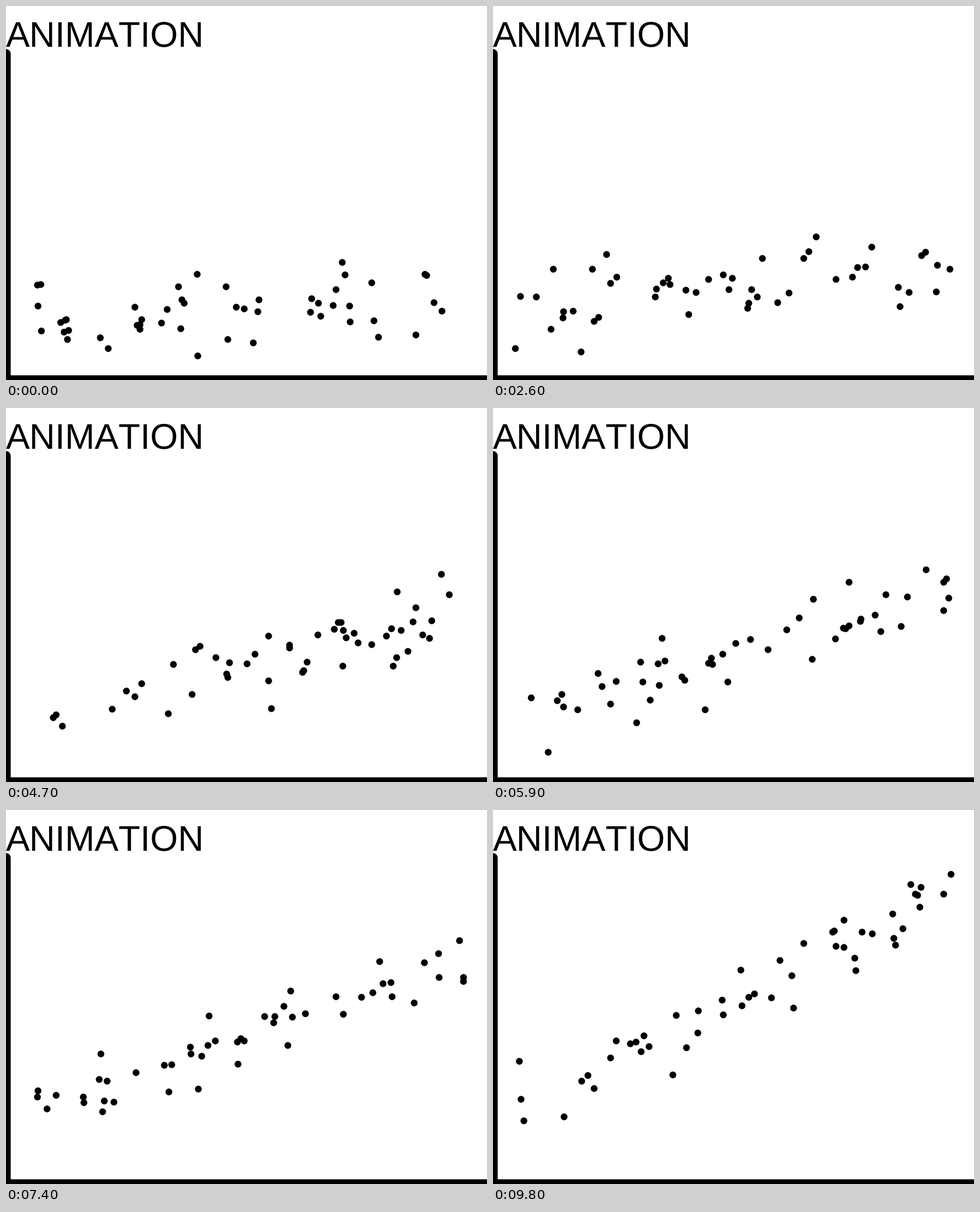
Animation of 849 by 660 pixels, one loop 10000 ms. Source, as a matplotlib script:

```python
import numpy as np
import matplotlib.pyplot as plt
from matplotlib.animation import FuncAnimation

W, H, DPI = 849, 660, 96
PX = 72 / DPI          # points per pixel
STEP = 100             # ms per tick
COUNT = 50
LEFT, RIGHT = 38, 811  # horizontal reach of the dots
TOP, BOTTOM = 110, 634
BAR = 16.6

# Plain letter advances: no hinting, kerning scaled down to nothing
plt.rcParams["text.hinting"] = "none"
plt.rcParams["text.kerning_factor"] = 6


def sample_index(ms):
    """Number of the sample on show: 200 ms, then 300 ms each, then 200 ms."""
    if ms < 200:
        return 0
    if ms < 6200:
        return 1 + (ms - 200) // 300
    return 21 + (ms - 6200) // 200


def sample(k):
    """Fresh random dots around a trend line that steepens with k."""
    rng = np.random.default_rng(700 + k)
    x = rng.uniform(LEFT, RIGHT, COUNT)
    trend = 548 - 0.5 * k - (0.02 + 0.0126 * k) * (x - LEFT)
    noise = np.clip(rng.normal(0, 33, COUNT), -85, 85)
    return np.column_stack([x, np.clip(trend + noise, TOP, BOTTOM)])


fig = plt.figure(figsize=(W / DPI, H / DPI), dpi=DPI, facecolor="white")
ax = fig.add_axes([0, 0, 1, 1])
ax.set(xlim=(0, W), ylim=(H, 0))
ax.axis("off")

ax.plot([0, 0, W], [76 + BAR / 2, H, H], color="black", lw=BAR * PX,
        solid_capstyle="round", solid_joinstyle="round", snap=False)
ax.text(0, 72, "ANIMATION", family="Liberation Sans", size=63 * PX,
        color="black", ha="left", va="baseline")
dots = ax.scatter([], [], s=(12 * PX) ** 2, c="black", linewidths=0)


def draw(i):
    dots.set_offsets(sample(sample_index(i * STEP)))
    return (dots,)


anim = FuncAnimation(fig, draw, frames=100, interval=STEP, repeat=True,
                     repeat_delay=0, blit=False)
plt.show()
```
